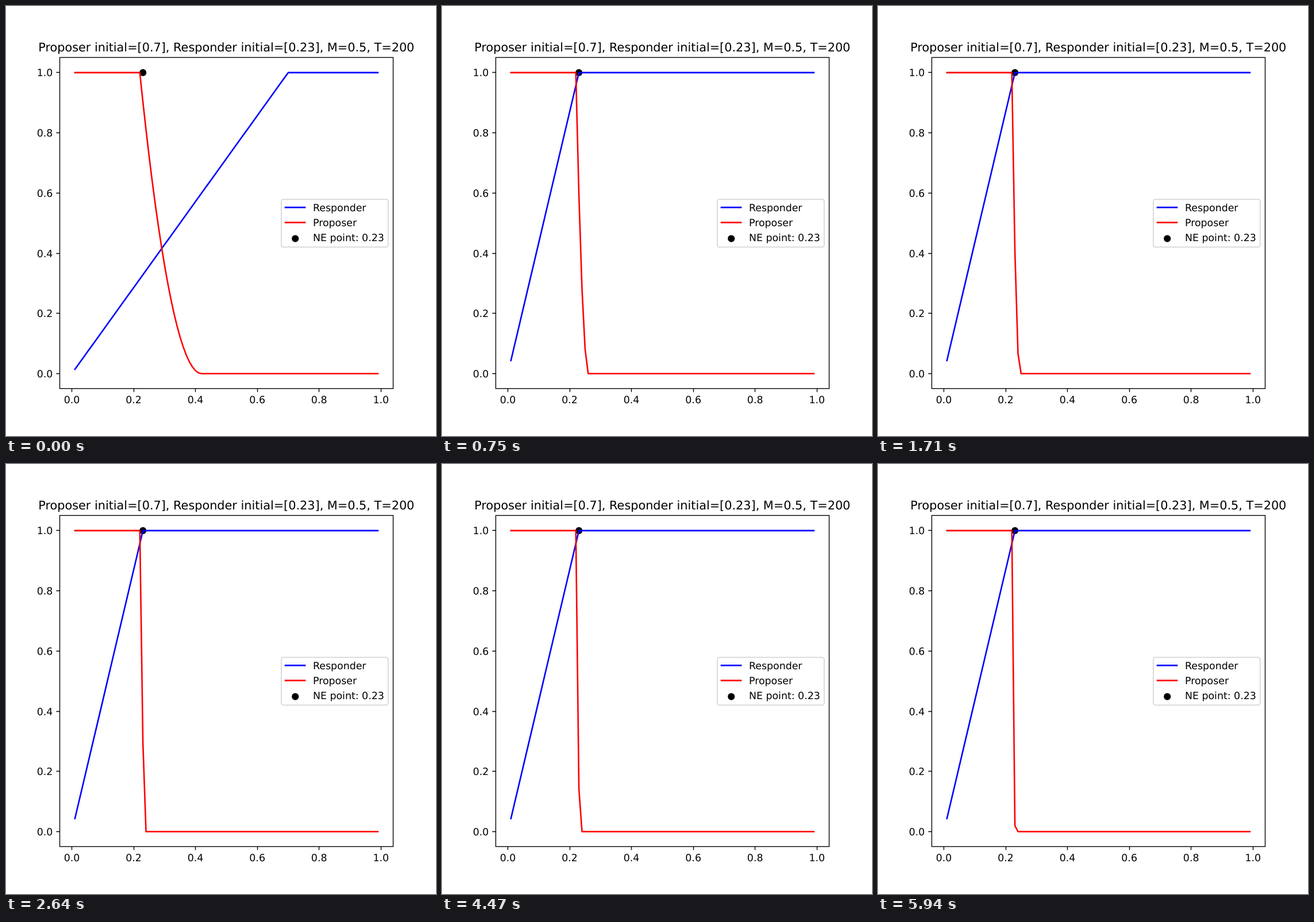
Animation of 748x748 px, one loop 5.97 s. Source, as an HTML page:

```html
<!DOCTYPE html>
<html>
<head>
<meta charset="utf-8">
<style>
  html, body { margin: 0; width: 100%; height: 100%; overflow: hidden; background: #fff; }
  svg { display: block; font: 17.36px "DejaVu Sans", sans-serif; text-rendering: geometricPrecision; }
  .line { fill: none; stroke-width: 2.6; stroke-linecap: square; stroke-linejoin: round; }
  .axis { fill: none; stroke: #000; stroke-width: 1.39; }
</style>
</head>
<body>
<svg width="748" height="748" viewBox="0 0 748 748">
  <text x="383.3" y="79.4" font-size="20.8" text-anchor="middle">Proposer initial=[0.7], Responder initial=[0.23], M=0.5, T=200</text>
  <circle id="point" r="6.07"/>
  <g id="ticks"></g>
  <polyline id="responder" class="line" stroke="#00f"/>
  <polyline id="proposer" class="line" stroke="#f00"/>
  <rect class="axis" x="93.5" y="89.5" width="580" height="576"/>
  <rect x="479" y="336.4" width="185.8" height="83" rx="3.5" fill="#fff" fill-opacity=".8" stroke="#ccc" stroke-opacity=".8" stroke-width="1.74"/>
  <path class="line" stroke="#00f" d="M486 350.4h34"/>
  <path class="line" stroke="#f00" d="M486 376.6h34"/>
  <circle cx="503.2" cy="404.6" r="6.07"/>
  <text x="534" y="356.6">Responder</text>
  <text x="534" y="382.8">Proposer</text>
  <text x="534" y="409">NE point: 0.23</text>
</svg>
<script>
const N = 99, STEPS = 199, STEP_MS = 30, M = 0.5;
const $ = id => document.getElementById(id);
const px = x => 114.5 + 537.7 * x;
const py = y => 639.5 - 523.6 * y;
const grid = Array.from({ length: N }, (_, i) => (i + 1) / 100);
const pure = k => grid.map((_, i) => +(i === k - 1));

// Euclidean projection onto the probability simplex
function project(v) {
  let sum = 0, shift = 0;
  [...v].sort((a, b) => b - a).forEach((value, i) => {
    sum += value;
    const s = (sum - 1) / (i + 1);
    if (value > s) shift = s;
  });
  return v.map(value => Math.max(0, value - shift));
}

function cumulative(p) {
  let sum = 0;
  return p.map(value => sum += value);
}

const points = ys => ys.map((y, i) => px(grid[i]).toFixed(2) + ',' + py(y).toFixed(2)).join(' ');

// Both players follow the regularized leader, updating simultaneously
function simulate() {
  let offers = pure(70), limits = pure(23);
  const offerGain = grid.map(() => 0), limitGain = grid.map(() => 0);
  const states = [];
  for (let n = 0; n < STEPS; n++) {
    const accept = cumulative(limits);
    let income = 0;
    for (let i = N - 1; i >= 0; i--) {
      income += offers[i] * grid[i];
      limitGain[i] += M * income;
      offerGain[i] += M * (1 - grid[i]) * accept[i];
    }
    offers = project(offerGain);
    limits = project(limitGain);
    states.push({
      responder: points(cumulative(limits)),
      proposer: points(cumulative(offers).map(c => 1 - c))
    });
  }
  return states;
}

let ticks = '';
for (let k = 0; k <= 5; k++) {
  const v = k / 5, label = v.toFixed(1);
  const x = Math.floor(px(v)) + 0.5, y = Math.floor(py(v)) + 0.5;
  ticks += `<path class="axis" d="M${x} 665.5v6.1M93.5 ${y}h-6.1"/>
    <text x="${px(v)}" y="691.4" text-anchor="middle">${label}</text>
    <text x="81.4" y="${py(v) + 6.5}" text-anchor="end">${label}</text>`;
}
$('ticks').innerHTML = ticks;
$('point').setAttribute('cx', px(0.23));
$('point').setAttribute('cy', py(1));

const states = simulate();
const start = performance.now();
function draw(now) {
  const step = Math.floor(Math.max(0, now - start) / STEP_MS) % STEPS;
  for (const id in states[step]) $(id).setAttribute('points', states[step][id]);
  requestAnimationFrame(draw);
}
draw(start);
</script>
</body>
</html>
```
